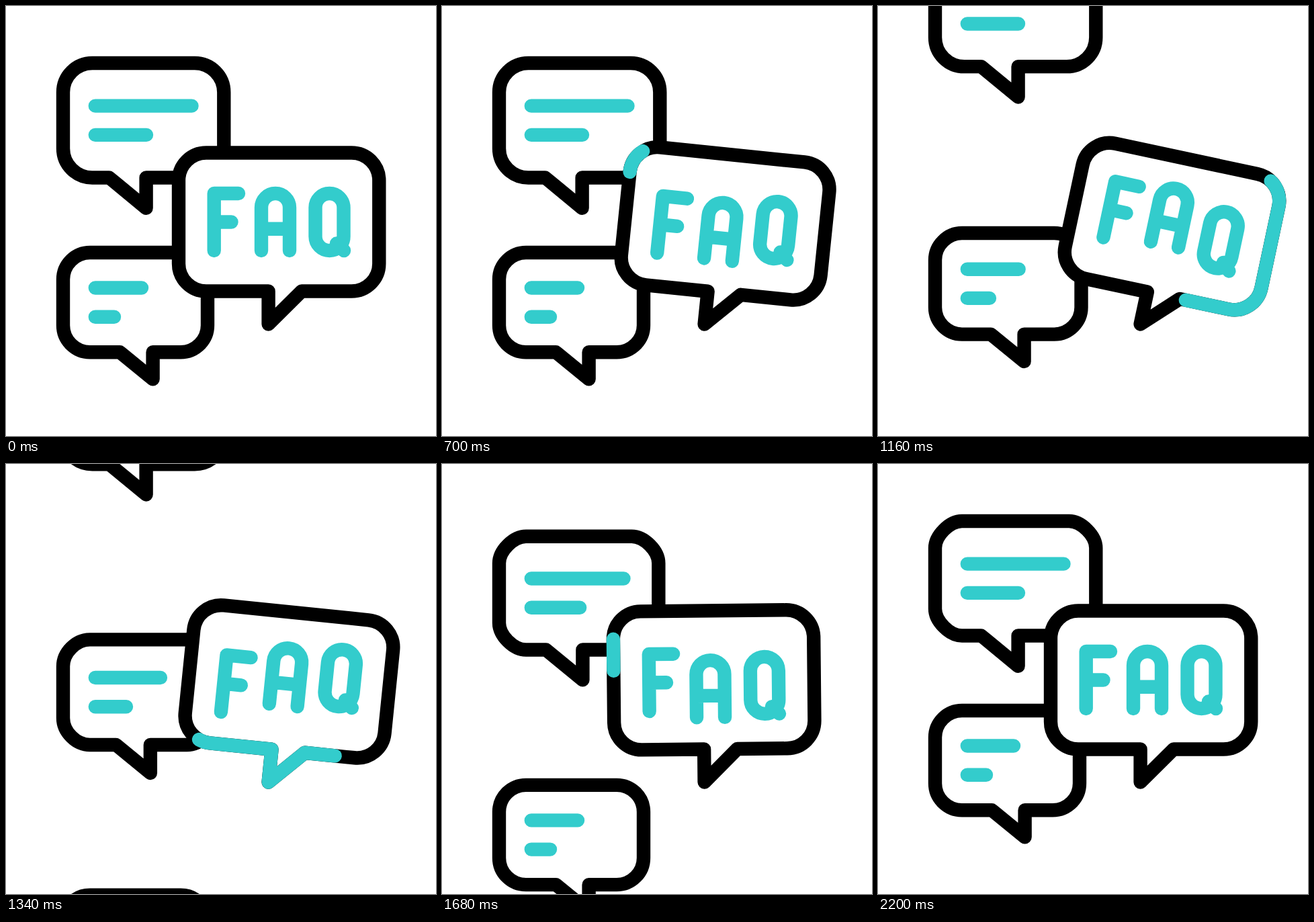
Animation of 640 by 640 pixels, one loop 2.4 s. Source, as an HTML page:

```html
<!DOCTYPE html>
<html lang="en">
<head>
<meta charset="utf-8">
<title>FAQ bubbles</title>
<style>
  html, body { margin: 0; width: 100%; height: 100%; overflow: hidden; background: #fff; }
  svg { display: block; width: 100%; height: 100%; }
  path { fill: none; stroke: #33cccc; stroke-width: 20.4; stroke-linecap: round; stroke-linejoin: round; }
  .shell { fill: #fff; stroke: #000; }
</style>
</head>
<body>
<svg viewBox="0 0 640 640" role="img" aria-label="FAQ">
  <g id="top"><path class="shell"/><path/></g>
  <g id="mid"><path class="shell"/><path/></g>
  <g id="low"><path class="shell"/><path/></g>
  <g id="faq">
    <path class="shell"/>
    <path id="glow"/>
    <path class="letter" d="M309.7 364V279H346M309.7 321.5H335.5"/>
    <path class="letter" d="M380 364V300a21 21 0 0 1 42 0V364M380 331.7H422"/>
    <path class="letter" d="M481.5 364a21 21 0 0 1 -21 -21V300a21 21 0 0 1 42 0V343a21 21 0 0 1 -21 21M492 353.5L503 364"/>
  </g>
</svg>
<script>
const LOOP = 2400, STEP = 20;
const $ = id => document.getElementById(id);

// r, k: corner radius and curve; tip: tail point; tipDrop: its depth; back, fore: tail base either side of the tip
const big = { x: 85, y: 85, w: 239.3, h: 170.5, r: 43.5, k: .552, tip: 208.6, tipDrop: 45.3, back: 55, fore: 0, long: 143.7, short: 76.2 };
const small = { x: 85, y: 367, w: 215, h: 148.3, r: 40, k: .552, tip: 218.6, tipDrop: 40, back: 49, fore: 0, long: 69.2, short: 28.2 };
const grown = { ...big, r: 40, k: .46 };
const panel = { x: 257, y: 218.5, w: 298.3, h: 206, r: 41, k: .552, tip: 390.6, tipDrop: 49, back: 0, fore: 49.4 };

// Smooth 0 to 1, beginning at start and lasting dur
function ease(t, start, dur) {
  const u = Math.min(1, Math.max(0, (t - start) / dur));
  return u * u * (3 - 2 * u);
}

// Eases through evenly spaced turning points
const wave = (t, start, step, turns) => turns.slice(1).reduce(
  (v, turn, i) => v + (turn - turns[i]) * ease(t, start + i * step, step), turns[0]);

function blend(a, b, f) {
  const out = {};
  for (const key in a) out[key] = a[key] + (b[key] - a[key]) * f;
  return out;
}

function outline({ x, y, w, h, r, k, tip, tipDrop, back, fore }) {
  const c = r * k, q = r - c, right = x + w, base = y + h;
  return `M${x} ${y + r}c0 ${-c} ${q} ${-r} ${r} ${-r}` +
    `H${right - r}c${c} 0 ${r} ${q} ${r} ${r}` +
    `V${base - r}c0 ${c} ${-q} ${r} ${-r} ${r}` +
    `H${tip + fore}L${tip} ${base + tipDrop}L${tip - back} ${base}` +
    `H${x + r}c${-c} 0 ${-r} ${-q} ${-r} ${-r}Z`;
}

function shape(group, b) {
  const [body, bars] = group.children;
  const left = b.x + 47.8, centre = b.y + b.h / 2, gap = 21.6;
  body.setAttribute('d', outline(b));
  bars.setAttribute('d', `M${left} ${centre - gap}h${b.long}M${left} ${centre + gap}h${b.short}`);
}

const move = (el, value) => el.setAttribute('transform', value);
const upper = $('top'), mid = $('mid'), low = $('low'), faq = $('faq'), glow = $('glow');
const letters = document.querySelectorAll('.letter');
shape(upper, big);
shape(low, small);
faq.firstElementChild.setAttribute('d', outline(panel));
glow.setAttribute('d', outline(panel));
const len = glow.getTotalLength();

function draw(t) {
  // The top bubble rocks and leaves, the middle one grows into it, a new one follows
  const tilt = wave(t, 220, 240, [0, -13.2, 0]);
  move(upper, `translate(0 ${-320 * ease(t, 700, 900)}) rotate(${tilt} 208.6 300.8)`);
  shape(mid, blend(small, grown, ease(t, 995, 830)));
  move(low, `translate(0 ${300 * (1 - ease(t, 1192, 830))})`);

  // The panel leans over, then swings back to rest
  const lean = ease(t, 220, 980) * wave(t, 1200, 333, [12.1, -4.4, 4.9, 0]);
  move(faq, `rotate(${lean} 390.6 473.5)`);
  letters.forEach((el, i) =>
    move(el, `translate(0 ${14.8 * wave(t, 220 + i * 195, 395, [0, 1, -1, 1, 0])})`));

  // Highlight running round the panel
  const head = len * ease(t, 580, 1030), tail = len * ease(t, 785, 1030);
  glow.style.display = head - tail > .5 ? '' : 'none';
  glow.setAttribute('stroke-dasharray', `${head - tail} ${len * 2}`);
  glow.setAttribute('stroke-dashoffset', -tail);
}

const start = performance.now();
function tick() {
  const t = (performance.now() - start) % LOOP;
  draw(Math.floor(t / STEP) * STEP);
  requestAnimationFrame(tick);
}
tick();
</script>
</body>
</html>
```
